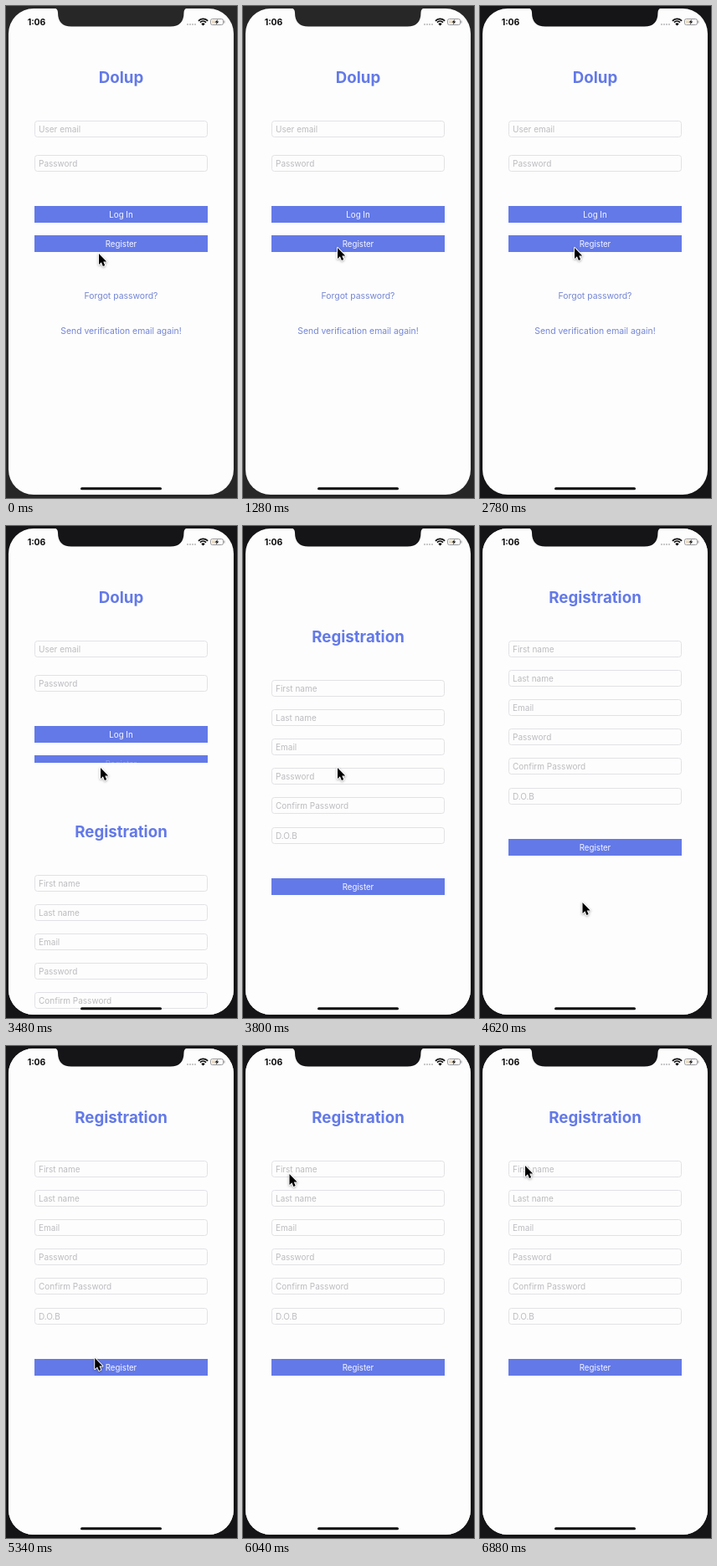
Write an HTML page with a canvas that moves like this. It is 276 px wide and 588 px high and loops after 8 s.

```html
<!DOCTYPE html>
<html lang="en">
<head>
<meta charset="utf-8">
<title>Sign up flow</title>
<style>
html, body { margin: 0; width: 276px; height: 588px; overflow: hidden; }
canvas { display: block; }
</style>
</head>
<body>
<canvas id="stage" width="276" height="588"></canvas>
<script>
const ctx = document.getElementById('stage').getContext('2d');
const LOOP = 8000;
const FONT = 'Inter, Roboto, "Liberation Sans", sans-serif';
const PAPER = '#fdfdfd', BLUE = '#6379e8', LINK = '#7486d6';
const BORDER = '#e2e2e6', HINT = '#bcbcc0', INK = '#0c0c0e', GREY = '#c9c9cb';

// Pointer tip: time, x, y
const PATH = [
  [0, 111, 296], [800, 113, 289], [4080, 113, 289], [4620, 122.5, 450],
  [5050, 123, 452], [5860, 66, 184], [6040, 55.5, 153],
  [6580, 55, 150], [6880, 54, 143]
];

const smooth = v => v * v * (3 - 2 * v);

function pointerAt(t) {
  const i = PATH.findIndex(p => p[0] > t);
  if (i < 0) return PATH[PATH.length - 1].slice(1);
  const a = PATH[i - 1], b = PATH[i];
  const k = smooth((t - a[0]) / (b[0] - a[0]));
  return [a[1] + (b[1] - a[1]) * k, a[2] + (b[2] - a[2]) * k];
}

// Critically damped slide of the sheet
function sheetOffset(t) {
  const u = Math.max(0, t - 3250) * 0.00753;
  const y = 582 * (1 + u) * Math.exp(-u);
  return y < 0.4 ? 0 : Math.round(y);
}

function text(str, x, y, size, color, weight = 400, align = 'center') {
  ctx.font = `${weight} ${size}px ${FONT}`;
  ctx.textAlign = align;
  ctx.fillStyle = color;
  ctx.fillText(str, x, y);
}

function field(label, y) {
  ctx.strokeStyle = BORDER;
  ctx.lineWidth = 1;
  ctx.beginPath();
  ctx.roundRect(34.5, y + 0.5, 206, 19, 3);
  ctx.stroke();
  text(label, 39, y + 14, 10, HINT, 400, 'left');
}

function button(label, y, alpha = 1) {
  ctx.fillStyle = BLUE;
  ctx.fillRect(34, y, 207, 20);
  ctx.globalAlpha = alpha;
  text(label, 137.5, y + 13.5, 9.7, '#f8f8ff');
  ctx.globalAlpha = 1;
}

function title(str) {
  text(str, 137.5, 91.5, 18.7, BLUE, 700);
}

function loginScreen(t) {
  title('Dolup');
  field('User email', 137);
  field('Password', 178);
  button('Log In', 239);
  const pressed = t > 3140 && t < 4100;
  button('Register', 274, pressed ? 0.3 : 1);
  text('Forgot password?', 137.5, 350, 10.4, LINK);
  text('Send verification email again!', 137.5, 392, 10.4, LINK);
}

function registerScreen() {
  ctx.fillStyle = PAPER;
  ctx.fillRect(3, 3, 270, 582);
  title('Registration');
  ['First name', 'Last name', 'Email', 'Password', 'Confirm Password', 'D.O.B']
    .forEach((label, i) => field(label, Math.round(137 + i * 35.1)));
  button('Register', 374);
}

function screenShape() {
  ctx.beginPath();
  ctx.roundRect(3, 3, 269, 581, 30);
}

function notch(color) {
  ctx.fillStyle = color;
  ctx.beginPath();
  ctx.moveTo(57, 2);
  ctx.quadraticCurveTo(62, 3, 62, 8);
  ctx.quadraticCurveTo(62, 24.5, 78, 24.5);
  ctx.lineTo(196.5, 24.5);
  ctx.quadraticCurveTo(212.5, 24.5, 212.5, 8);
  ctx.quadraticCurveTo(212.5, 3, 217.5, 2);
  ctx.fill();
}

function statusBar() {
  text('1:06', 36.5, 23, 10.4, INK, 700);
  ctx.fillStyle = GREY;
  for (let i = 0; i < 4; i++) ctx.fillRect(216 + i * 3, 21, 2, 2);

  ctx.strokeStyle = INK;
  ctx.lineWidth = 1.8;
  for (const r of [7.6, 4.8]) {
    ctx.beginPath();
    ctx.arc(235.5, 23, r, -Math.PI * 0.76, -Math.PI * 0.24);
    ctx.stroke();
  }
  ctx.fillStyle = INK;
  ctx.beginPath();
  ctx.moveTo(235.5, 23.5);
  ctx.arc(235.5, 23.5, 3, -Math.PI * 0.76, -Math.PI * 0.24);
  ctx.fill();

  ctx.strokeStyle = '#97979a';
  ctx.lineWidth = 1;
  ctx.beginPath();
  ctx.roundRect(244.5, 15.5, 15, 7, 2);
  ctx.stroke();
  ctx.fillStyle = '#97979a';
  ctx.fillRect(260.4, 17.5, 1, 3);
  ctx.fillStyle = '#e8dcc8';
  ctx.fillRect(246, 17, 5, 4);
  ctx.fillStyle = INK;
  ctx.beginPath();
  [[253, 16], [249.6, 19.5], [251.7, 19.5], [250.9, 22.2], [254.4, 18.6], [252.3, 18.6]]
    .forEach(p => ctx.lineTo(...p));
  ctx.fill();
}

function pointer(x, y) {
  ctx.save();
  ctx.translate(x, y);
  ctx.scale(0.92, 0.92);
  ctx.beginPath();
  [[0, 0], [0, 14], [3.2, 11.2], [5.3, 16.2], [7.8, 15.1], [5.7, 10.2], [10, 10.2]]
    .forEach(p => ctx.lineTo(...p));
  ctx.closePath();
  ctx.lineJoin = 'round';
  ctx.lineWidth = 2;
  ctx.strokeStyle = '#fff';
  ctx.shadowColor = 'rgba(0, 0, 0, 0.35)';
  ctx.shadowBlur = 3;
  ctx.shadowOffsetY = 1;
  ctx.stroke();
  ctx.shadowColor = 'transparent';
  ctx.fillStyle = '#000';
  ctx.fill();
  ctx.restore();
}

function draw(t) {
  const frame = t < 2500 ? '#272728' : '#151517';
  ctx.fillStyle = frame;
  ctx.fillRect(0, 0, 276, 588);

  ctx.save();
  screenShape();
  ctx.fillStyle = PAPER;
  ctx.fill();
  ctx.clip();
  const y = sheetOffset(t);
  if (y > 0) loginScreen(t);
  if (y < 582) {
    ctx.translate(0, y);
    registerScreen();
  }
  ctx.restore();

  notch(frame);
  statusBar();
  ctx.fillStyle = '#08080a';
  ctx.beginPath();
  ctx.roundRect(89, 575.3, 97, 3, 1.5);
  ctx.fill();
  pointer(...pointerAt(t));
}

const start = performance.now();
function tick() {
  draw((performance.now() - start) % LOOP);
  requestAnimationFrame(tick);
}
tick();
</script>
</body>
</html>
```
